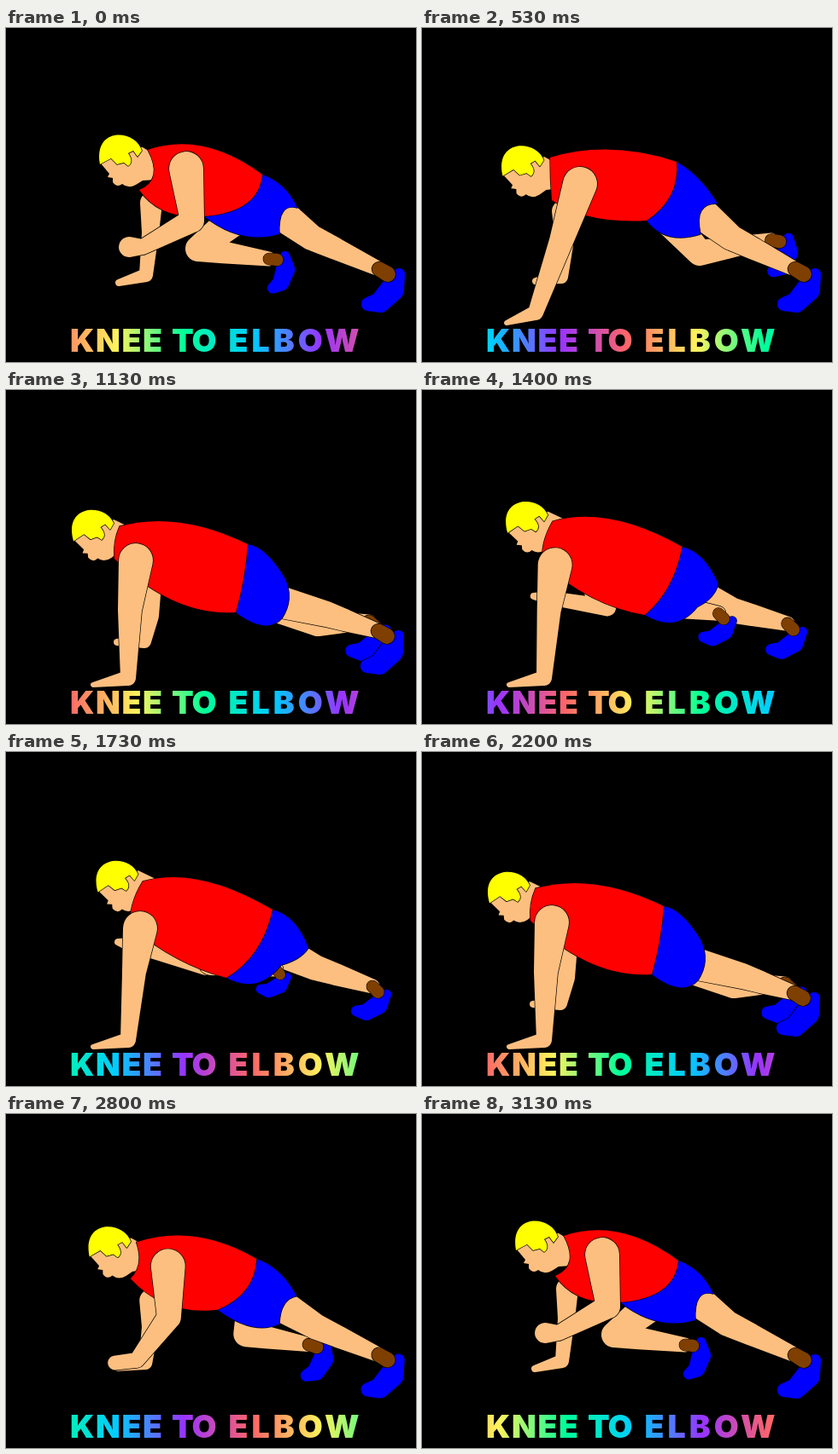
Animation, 480 px wide and 392 px high, one loop 3190 ms. Source, as an HTML page:

```html
<!DOCTYPE html>
<html lang="en">
<head>
<meta charset="utf-8">
<title>Knee to elbow</title>
<style>
html, body { margin: 0; width: 100%; height: 100%; overflow: hidden; background: #000; }
svg { display: block; width: 100%; height: 100%; }
path { stroke: #000; stroke-width: 1.4px; stroke-linejoin: round; paint-order: stroke; }
.skin { fill: #fdbf7f; }
.hair { fill: #ff0; }
.shirt { fill: #f00; }
.blue { fill: #00f; }
.sock { fill: #7f3f00; }
text { font: 900 37.5px Inter, "Open Sans", sans-serif; fill: url(#rainbow);
  stroke: #000; stroke-width: 3px; stroke-linejoin: round; paint-order: stroke; }
</style>
</head>
<body>
<svg viewBox="0 0 480 392">
  <defs>
    <linearGradient id="rainbow" gradientUnits="userSpaceOnUse" x1="77" y1="0" x2="477" y2="0" spreadMethod="repeat">
      <stop offset="0" stop-color="#f66"/>
      <stop offset=".2" stop-color="#fff35c"/>
      <stop offset=".4" stop-color="#0f9"/>
      <stop offset=".6" stop-color="#0cf"/>
      <stop offset=".8" stop-color="#93f"/>
      <stop offset="1" stop-color="#f66"/>
    </linearGradient>
  </defs>
  <path id="farArm" class="skin"/>
  <path id="farLeg" class="skin"/>
  <g id="farFoot"></g>
  <path id="leg" class="skin"/>
  <g id="foot"></g>
  <path id="shorts" class="blue"/>
  <g id="head">
    <path class="skin" d="M-16-2L-23 8-18 14-13 20-15 24-9 25-9 30Q-4 37 2 32Q9 38 18 33L26 28 42 27 44 0 26-11 0-11Z"/>
    <path class="hair" d="M-24 9C-32-36 18-32 25-7L20 0 15-7 9-4Q16 6 9 11L4 7-4 9-11 2Z"/>
  </g>
  <path id="shirt" class="shirt"/>
  <path id="arm" class="skin"/>
  <text y="380"><tspan x="75" letter-spacing="1.6">KNEE</tspan><tspan x="194" letter-spacing="-1">TO</tspan><tspan x="260.5" letter-spacing="4">ELBOW</tspan></text>
</svg>
<script>
const $ = id => document.getElementById(id);
const mix = (a, b, u) => a + (b - a) * u;

// Outline of circles [x, y, r] joined by tapered bars
function chain(circles) {
  let d = '';
  for (let i = 1; i < circles.length; i++) {
    const [a, b] = [circles[i - 1], circles[i]];
    const dir = Math.atan2(b[1] - a[1], b[0] - a[0]);
    const gap = Math.hypot(b[0] - a[0], b[1] - a[1]) || 1;
    const open = Math.acos(Math.max(-1, Math.min(1, (a[2] - b[2]) / gap)));
    const rim = (c, turn) => [0, 1].map(k =>
      (c[k] + c[2] * (k ? Math.sin(dir + turn) : Math.cos(dir + turn))).toFixed(2));
    const arc = (c, big, turn) => `A${c[2]} ${c[2]} 0 ${+big} 1 ${rim(c, turn)}`;
    const wide = open > Math.PI / 2;
    d += `M${rim(a, open)}${arc(a, !wide, -open)}L${rim(b, -open)}${arc(b, wide, open)}Z`;
  }
  return d;
}

const armPath = ([sx, sy, ex, ey, wx, wy, hx, hy], r) =>
  chain([[sx, sy, r[0]], [ex, ey, r[1]], [wx, wy, r[2]], [hx, hy, r[3]]]);
const legPath = ([hx, hy, kx, ky, ax, ay]) =>
  chain([[hx, hy, 19], [kx, ky, 15], [mix(kx, ax, .35), mix(ky, ay, .35), 13], [ax, ay, 8.5]]);

$('foot').innerHTML = $('farFoot').innerHTML =
  `<path class="blue" d="${chain([[23, 6, 7], [15, 24, 14], [1, 39, 12], [-13, 41, 8]])}"/>` +
  `<path class="sock" d="${chain([[0, 0, 8.5], [10, 6, 9]])}"/>`;

// head: x, y, turn; feet: turn, scale; limbs: joints from the body outward
// torso: nape, back, waist, hem, belt, belly, chest, collar; shorts: seat, back hem, leg, front hem, crotch
const tuckNear = {
  head: [134, 151, 0],
  torso: [166, 143, 231, 121, 300, 172, 296, 216, 232, 221, 180, 225, 156, 190, 185, 178],
  shorts: [328, 182, 341, 211, 318, 205, 320, 242, 275, 255],
  arm: [211, 165, 218, 226, 160, 257, 144, 257], grip: [12],
  farArm: [170, 205, 169, 240, 164, 290, 132, 299],
  leg: [320, 217, 358, 246, 437, 283], foot: [0, 1],
  farLeg: [268, 224, 225, 259, 308, 271], farFoot: [-25, .8]
};
const opening = {
  ...tuckNear, head: [118, 163.5, -3],
  torso: [150, 152, 220, 131, 298, 157, 302, 200, 263, 226, 192, 230, 152, 202, 150, 178],
  shorts: [325, 172, 346, 206, 318, 205, 326, 242, 285, 255],
  arm: [185, 183, 163, 250, 133, 334, 99, 346], grip: [3],
  farArm: [165, 215, 167, 255, 163, 292, 133, 297],
  leg: [328, 218, 362, 246, 437, 283],
  farLeg: [290, 225, 325, 264, 409, 249], farFoot: [-21, .85]
};
const plank = {
  ...opening, head: [102, 166, -6],
  torso: [133, 160, 202, 141, 283, 181, 280, 222, 269, 261, 197, 266, 127, 198, 125, 178],
  shorts: [304, 184, 326, 220, 338, 245, 323, 268, 305, 288],
  arm: [152, 200, 145, 258, 143, 338, 102, 346],
  farArm: [168, 240, 169, 265, 162, 295, 130, 296],
  leg: [318, 248, 375, 263, 436, 283],
  farLeg: [315, 253, 365, 274, 425, 272], farFoot: [13, .92]
};
const plankHigh = {
  ...plank, head: [102, 168, -5],
  torso: [132, 162, 206, 138, 283, 167, 284, 205, 272, 243, 195, 255, 130, 198, 127, 178],
  shorts: [315, 178, 339, 218, 326, 236, 320, 254, 310, 268],
  arm: [157, 199, 149, 258, 143, 338, 102, 346],
  leg: [328, 238, 370, 255, 436, 282],
  farLeg: [320, 238, 368, 257, 426, 270], farFoot: [5, .92]
};
const tuckFar = {
  ...plank, head: [130.5, 153, -6],
  torso: [160, 152, 224, 133, 312, 185, 300, 240, 258, 265, 198, 249, 146, 205, 143, 180],
  shorts: [340, 192, 354, 230, 345, 244, 322, 250, 295, 285],
  arm: [157, 207, 150, 258, 143, 338, 102, 346],
  farArm: [215, 235, 234, 252, 145, 226, 131, 223],
  leg: [270, 240, 240, 247, 316, 255], foot: [20, .68],
  farLeg: [325, 235, 362, 253, 429, 275], farFoot: [15, .8]
};

const moves = [[0, tuckNear], [2, tuckNear], [8, opening], [12, plankHigh], [17, plank], [23, tuckFar],
  [26, tuckFar], [32, plank], [33, plank], [38, plankHigh], [45, tuckNear], [48, tuckNear]];

function poseAt(k) {
  const i = moves.findIndex(m => k < m[0]);
  const [[t0, from], [t1, to]] = [moves[i - 1], moves[i]];
  const u = (k - t0) / (t1 - t0);
  const ease = u * u * (3 - 2 * u);
  const pose = {};
  for (const part in from) pose[part] = from[part].map((v, j) => mix(v, to[part][j], ease));
  return pose;
}

function place(id, x, y, turn, scale = 1) {
  $(id).setAttribute('transform', `translate(${x} ${y}) rotate(${turn}) scale(${scale})`);
}
const shape = (id, d) => $(id).setAttribute('d', d);
const points = list => list.flatMap((v, i) => i % 2 ? [] : [`${v} ${list[i + 1]} `]);

function draw(k) {
  const p = poseAt(k);
  const [nape, back, waist, hem, belt, belly, chest, collar] = points(p.torso);
  const [seat, backHem, thigh, frontHem, crotch] = points(p.shorts);
  shape('shirt', `M${nape}Q${back}${waist}Q${hem}${belt}Q${belly}${chest}Q${collar}${nape}Z`);
  shape('shorts', `M${waist}Q${seat}${backHem}Q${thigh}${frontHem}Q${crotch}${belt}Q${hem}${waist}Z`);
  shape('arm', armPath(p.arm, [20, 14, 9, p.grip[0]]));
  shape('farArm', armPath(p.farArm, [13, 10, 8, 4]));
  shape('leg', legPath(p.leg));
  shape('farLeg', legPath(p.farLeg));
  place('head', ...p.head);
  place('foot', ...p.leg.slice(4), ...p.foot);
  place('farFoot', ...p.farLeg.slice(4), ...p.farFoot);
  $('rainbow').setAttribute('gradientTransform', `translate(${80 * (.3 * (k % 16) - .35)} 0)`);
}

const LOOP = 3190, STEP = 1000 / 15;
const start = performance.now();
let last = 0;
function tick() {
  const t = (performance.now() - start) % LOOP;
  const k = Math.min(47, Math.floor((t + 3.4) / STEP));
  if (k !== last) draw(last = k);
  requestAnimationFrame(tick);
}
draw(0);
tick();
</script>
</body>
</html>
```
